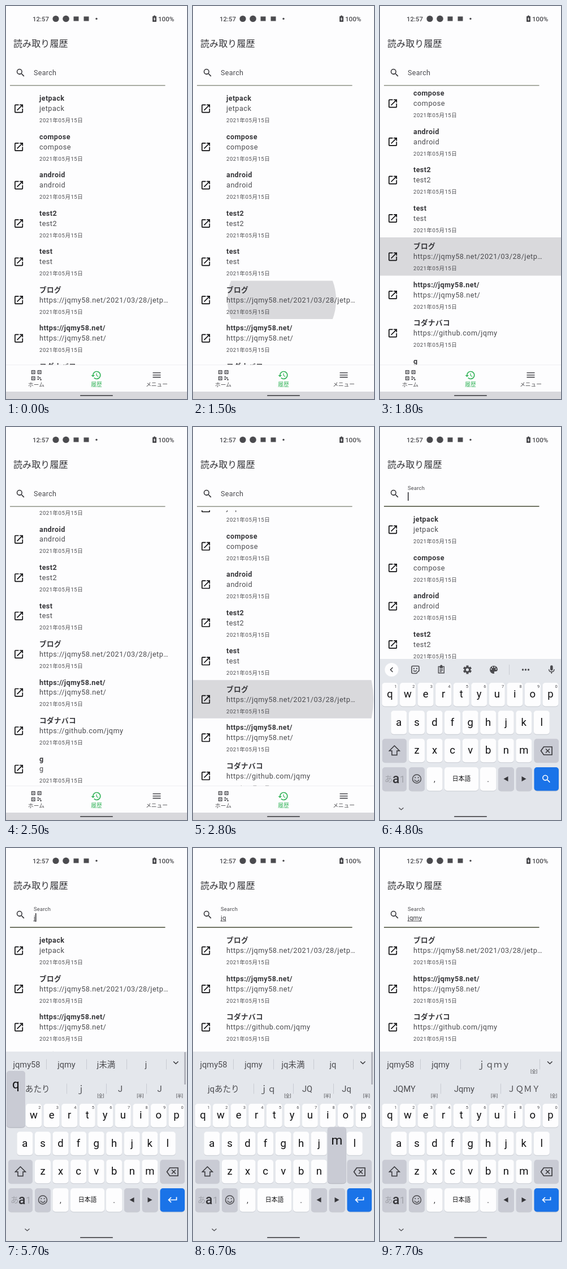
Write an HTML page with a canvas that moves like this. It is 320x693 px and loops after 8 s.

```html
<!DOCTYPE html>
<html lang="ja">
<head>
<meta charset="utf-8">
<title>読み取り履歴</title>
<style>
html, body { margin: 0; width: 100%; height: 100%; overflow: hidden; background: #fdfdfe; }
canvas { display: block; width: 320px; height: 693px; }
</style>
</head>
<body>
<canvas id="stage"></canvas>
<script>
const W = 320, H = 693, LOOP = 8000, STEP = 100;
const FONT = 'Roboto, "Noto Sans CJK JP", "Noto Sans CJK", sans-serif';
const C = {
  bg: '#fdfdfe', ink: '#36363a', soft: '#4b4b4f', black: '#101012', green: '#35b45a',
  board: '#e4e7ec', key: '#fdfdfe', mod: '#c9cbd4', down: '#b2b4bd', edge: '#c8cbd2',
  blue: '#1a73e8', faint: '#a0a2a9', ripple: '#d9d9dc', strip: '#d8d8dc', field: '#5a5f4c'
};
const canvas = document.getElementById('stage');
const ctx = canvas.getContext('2d');
const dpr = window.devicePixelRatio || 1;
canvas.width = W * dpr;
canvas.height = H * dpr;

const ICONS = {
  open: 'M19 19H5V5h7V3H5a2 2 0 0 0-2 2v14a2 2 0 0 0 2 2h14c1.1 0 2-.9 2-2v-7h-2zM14 3v2h3.59l-9.83 9.83 1.41 1.41L19 6.41V10h2V3z',
  search: 'M15.5 14h-.79l-.28-.27A6.47 6.47 0 0 0 16 9.5 6.5 6.5 0 1 0 9.5 16c1.61 0 3.09-.59 4.23-1.57l.27.28v.79l5 4.99L20.49 19zm-6 0a4.5 4.5 0 1 1 0-9 4.5 4.5 0 0 1 0 9z',
  history: 'M13 3a9 9 0 0 0-9 9H1l4 4 4-4H6a7 7 0 1 1 2.06 4.94l-1.42 1.42A9 9 0 1 0 13 3zm-1 5v5l4.28 2.54.72-1.21-3.5-2.08V8z',
  menu: 'M3 6h18v2H3zM3 11h18v2H3zM3 16h18v2H3z',
  mic: 'M12 14a3 3 0 0 0 3-3V5a3 3 0 0 0-6 0v6a3 3 0 0 0 3 3zm5-3a5 5 0 0 1-10 0H5a7 7 0 0 0 6 6.9V21h2v-3.1A7 7 0 0 0 19 11z',
  palette: 'M12 3a9 9 0 0 0 0 18c1.5 0 2-1.4 1.2-2.5-.8-1 0-2.5 1.3-2.5H16a5 5 0 0 0 5-5c0-4.4-4-8-9-8zM6.5 12a1.5 1.5 0 1 1 0-3 1.5 1.5 0 0 1 0 3zm3-4a1.5 1.5 0 1 1 0-3 1.5 1.5 0 0 1 0 3zm5 0a1.5 1.5 0 1 1 0-3 1.5 1.5 0 0 1 0 3zm3 4a1.5 1.5 0 1 1 0-3 1.5 1.5 0 0 1 0 3z',
  clip: 'M4 3h5a3 3 0 0 1 6 0h5v18H4zM6 5v14h12V5h-2v3H8V5zM8 10h8v1.7H8zM8 13h8v1.7H8zM8 16h5v1.7H8z'
};
for (const k in ICONS) ICONS[k] = new Path2D(ICONS[k]);

const ITEMS = [
  ['jetpack', 'jetpack'], ['compose', 'compose'], ['android', 'android'],
  ['test2', 'test2'], ['test', 'test'],
  ['ブログ', 'https://jqmy58.net/2021/03/28/jetp…'],
  ['https://jqmy58.net/', 'https://jqmy58.net/'],
  ['コダナバコ', 'https://github.com/jqmy'], ['g', 'g']
];
const ROW = 67.5, LIST_TOP = 147, SCROLL_MAX = 118;

const EDITS = [[3400, ''], [5400, 'j'], [5800, 'jq'], [6800, 'jqm'], [7200, 'jqmy']];
const PRESSES = [['j', 5200, 5400], ['q', 5600, 5800], ['m', 6700, 6800], ['y', 7100, 7200]];
const RIPPLES = [[1500, 1900], [2600, 2900]];

function ease(t, from, to) {
  const u = Math.min(1, Math.max(0, (t - from) / (to - from)));
  return u * u * (3 - 2 * u);
}
// swipe up to the end of the list, then back to its top
const scrollAt = t => SCROLL_MAX * (ease(t, 1500, 2000) - ease(t, 2490, 2990));
const lastEdit = t => EDITS.filter(e => e[0] <= t).pop() || [0, ''];

function text(s, x, y, size, { color = C.ink, weight = 400, gap = 0, align = 'left' } = {}) {
  ctx.font = `${weight} ${size}px ${FONT}`;
  ctx.letterSpacing = gap + 'px';
  ctx.textAlign = align;
  ctx.fillStyle = color;
  ctx.fillText(s, x, y + size * .35);
  return ctx.measureText(s).width;
}
const mid = (s, x, y, size, opt) => text(s, x, y, size, { align: 'center', ...opt });

function rect(x, y, w, h, color) {
  ctx.fillStyle = color;
  ctx.fillRect(x, y, w, h);
}
function round(x, y, w, h, r, color) {
  ctx.fillStyle = color;
  ctx.beginPath();
  ctx.roundRect(x, y, w, h, r);
  ctx.fill();
}
function dot(x, y, r, color) {
  ctx.fillStyle = color;
  ctx.beginPath();
  ctx.arc(x, y, r, 0, 7);
  ctx.fill();
}
function line(points, color = C.ink, width = 1.5) {
  ctx.strokeStyle = color;
  ctx.lineWidth = width;
  ctx.beginPath();
  points.forEach(([x, y]) => ctx.lineTo(x, y));
  ctx.stroke();
}
function poly(points, color) {
  ctx.fillStyle = color;
  ctx.beginPath();
  points.forEach(([x, y]) => ctx.lineTo(x, y));
  ctx.fill();
}
function at(x, y, s, draw) {
  ctx.save();
  ctx.translate(x, y);
  ctx.scale(s, s);
  draw();
  ctx.restore();
}
function icon(name, x, y, size, color) {
  at(x, y, size / 24, () => {
    ctx.translate(-12, -12);
    ctx.fillStyle = color;
    ctx.fill(ICONS[name]);
  });
}
function clipped(x, y, w, h, draw) {
  ctx.save();
  ctx.beginPath();
  ctx.rect(x, y, w, h);
  ctx.clip();
  draw();
  ctx.restore();
}

function statusBar() {
  text('12:57', 47, 23, 11.4, { weight: 500, color: C.soft });
  dot(88, 22.5, 5.6, C.soft);
  dot(106, 22.5, 5.8, C.soft);
  rect(119.5, 18.5, 9, 8, C.soft);
  rect(137.5, 18.5, 9, 8, C.soft);
  dot(160, 22.5, 1.7, C.soft);
  round(259, 18, 7, 10, 1, C.soft);
  rect(261, 16.8, 3, 2, C.soft);
  poly([[263, 19.5], [260.8, 23.5], [262.2, 23.5], [262, 26.5], [264.3, 22.4], [262.8, 22.4]], C.bg);
  text('100%', 269, 23, 11.6, { weight: 500, color: C.soft });
}

function header(t) {
  const focus = t >= 3400;
  const [since, query] = lastEdit(t);
  text('読み取り履歴', 13, 66.3, 16, { gap: .1 });
  icon('search', 25.8, 117.8, 18.7, C.ink);
  const k = ease(t, 3300, 3500);
  text('Search', 49, 117.5 - 9.5 * k, 12.5 - 3.1 * k, { gap: .3 - .1 * k, color: C.soft });
  rect(7, focus ? 139 : 139.6, 274.5, focus ? 1.7 : 1, C.field);
  if (!focus) return;
  let w = 0;
  if (query) {
    w = text(query, 49, 122.8, 11.4, { gap: .15 });
    rect(49, 128.4, w, 1, C.soft);
  }
  if (Math.floor((t - since) / 500) % 2 === 0) rect(49 + w, 115, 1.6, 15, C.ink);
}

function ripple(t, y) {
  for (const [start, end] of RIPPLES) {
    if (t < start || t >= end + 100) continue;
    ctx.globalAlpha = t >= end ? .5 : 1;
    clipped(0, y, W, ROW, () => dot(157, y + ROW / 2, Math.min(200, 96 + (t - start) * .33), C.ripple));
    ctx.globalAlpha = 1;
  }
}

function list(t, bottom) {
  const query = lastEdit(t - 100)[1];
  const shown = ITEMS.filter(item => item.join(' ').includes(query));
  const scroll = scrollAt(t);
  clipped(0, LIST_TOP, W, bottom - LIST_TOP, () => shown.forEach(([name, url], i) => {
    const y = 147 + i * ROW - scroll;
    if (name === 'ブログ') ripple(t, y);
    icon('open', 22.6, y + 34, 20, C.black);
    text(name, 59, y + 16, 12.6, { weight: 700, gap: .4 });
    text(url, 59, y + 33.8, 12.7, { gap: .48, color: C.soft });
    text('2021年05月15日', 59, y + 55, 9.5, { gap: .55, color: C.soft });
  }));
}

function codeIcon(x, y) {
  at(x, y, .78, () => {
    [[-11, -11], [3, -11], [-11, 3]].forEach(([a, b]) => {
      ctx.strokeStyle = C.soft;
      ctx.lineWidth = 1.8;
      ctx.strokeRect(a + 1, b + 1, 7, 7);
      rect(a + 3.3, b + 3.3, 2.4, 2.4, C.soft);
    });
    [[3, 3], [7, 5], [3, 8], [9, 9]].forEach(([a, b]) => rect(a, b, 3, 3, C.soft));
  });
}

function tabs() {
  rect(0, 633, W, 48, C.bg);
  rect(0, 632.5, W, .8, '#ececee');
  codeIcon(53.3, 650.7);
  icon('history', 159.5, 651, 19.5, C.green);
  icon('menu', 266.5, 650.7, 18.7, C.soft);
  mid('ホーム', 53.5, 668, 9.6, { color: C.soft });
  mid('履歴', 160, 668, 9.8, { color: C.green, weight: 500 });
  mid('メニュー', 266.5, 668, 9.7, { color: C.soft });
  rect(0, 680, W, 13, C.strip);
}

function gear(x, y) {
  for (let i = 0; i < 6; i++) {
    ctx.save();
    ctx.translate(x, y);
    ctx.rotate(i * Math.PI / 3);
    rect(-2, -7.5, 4, 4, C.soft);
    ctx.restore();
  }
  dot(x, y, 5.5, C.soft);
  dot(x, y, 2.6, C.board);
}

function face(x, y, r) {
  ctx.strokeStyle = C.soft;
  ctx.lineWidth = 1.5;
  ctx.beginPath();
  ctx.arc(x, y, r, 0, 7);
  ctx.stroke();
  ctx.beginPath();
  ctx.arc(x, y + .5, r * .52, .2, Math.PI - .2);
  ctx.stroke();
  dot(x - r * .36, y - r * .3, 1.1, C.soft);
  dot(x + r * .36, y - r * .3, 1.1, C.soft);
}

function toolbar(y) {
  dot(20.5, y, 12, C.key);
  line([[22.5, y - 4], [18.5, y], [22.5, y + 4]]);
  ctx.strokeStyle = C.soft;
  ctx.lineWidth = 1.6;
  ctx.beginPath();
  ctx.roundRect(56, y - 6.5, 13, 13, 2);
  ctx.stroke();
  poly([[70, y + 2], [70, y + 8], [64, y + 8]], C.board);
  line([[69, y + 1.5], [64, y + 6.5]], C.soft);
  dot(60, y - 2, 1.2, C.soft);
  dot(65, y - 2, 1.2, C.soft);
  line([[59, y + 1.5], [62, y + 3], [65, y + 1.5]], C.soft);
  icon('clip', 108.3, y, 17, C.soft);
  gear(154.5, y);
  icon('palette', 201, y, 18.5, C.soft);
  rect(228, y - 9, 1, 18, C.edge);
  [-5, 0, 5].forEach(d => dot(257.5 + d, y, 1.7, C.soft));
  icon('mic', 303.3, y, 18.5, C.soft);
}

function key(x, y, w, h, color = C.key) {
  round(x, y + 1, w, h, 5, C.edge);
  round(x, y, w, h, 5, color);
}
function eraser(x, y) {
  ctx.strokeStyle = C.ink;
  ctx.lineWidth = 1.6;
  ctx.beginPath();
  [[-10, 0], [-5, -7], [9.5, -7], [9.5, 7], [-5, 7]].forEach(([a, b]) => ctx.lineTo(x + a, y + b));
  ctx.closePath();
  ctx.stroke();
  line([[x - 1.5, y - 3.5], [x + 5.5, y + 3.5]]);
  line([[x + 5.5, y - 3.5], [x - 1.5, y + 3.5]]);
}
const arrow = (x, y, d) => poly([[x + 4 * d, y], [x - 4 * d, y - 4.5], [x - 4 * d, y + 4.5]], C.ink);

function boardFoot() {
  line([[33.5, 671.5], [37.5, 675], [41.5, 671.5]], C.soft, 1.3);
}

function kanaBoard(t) {
  const ys = [478, 527, 576, 624.5], xs = [4, 67, 130, 193.5, 257], w = 59.5, h = 42.5;
  rect(0, 435, W, 300, C.board);
  toolbar(454.5);
  ys.forEach((y, r) => xs.forEach((x, c) => {
    let color = c % 4 ? C.key : C.mod;
    if (r === 3 && c === 4) color = C.blue;
    if (r === 3 && c === 0 && t >= 4700) color = C.down;
    key(x, y, w, h, color);
  }));
  ['あかさ', 'たなは', 'まやら', ' わ '].forEach((s, r) =>
    [...s].forEach((ch, c) => mid(ch, xs[c + 1] + w / 2, ys[r] + 21, 18, { color: C.black })));
  line([[44, 502], [44, 498.5], [23, 498.5]]);
  line([[28, 494], [23, 498.5], [28, 503]]);
  arrow(33, 548, -1);
  face(25.5, 597, 7.8);
  text('記', 35.5, 597, 15);
  text('あ', 15, 646, 15.5, { weight: 700 });
  text('a1', 31, 646, 18, { color: C.faint });
  eraser(286.5, 499);
  arrow(286.5, 548, 1);
  line([[279, 596], [279, 599.5], [294.5, 599.5], [294.5, 596]]);
  icon('search', 286.5, 645.5, 19, '#fff');
  mid('゛゜', 99, 643, 17, { color: C.black });
  mid('大⇔小', 96.5, 653, 7.5);
  mid('?', 222.5, 634, 9);
  mid('、', 224, 643, 10);
  mid('!', 237, 645, 9);
  mid('。', 209, 643, 10);
  mid('…', 222.5, 656, 9);
  boardFoot();
}

const LETTERS = [['qwertyuiop', 17.5, 451], ['asdfghjkl', 33.4, 500.3], ['zxcvbnm', 65, 549.7]];
const PITCH = 31.55, KEY_W = 28, KEY_H = 41.5;

function alphaBoard(query, top) {
  rect(0, top, W, H - top, C.board);
  if (top > 400) toolbar(428);
  LETTERS.forEach(([row, x0, y], r) => [...row].forEach((ch, i) => {
    const x = x0 + i * PITCH;
    key(x - KEY_W / 2, y, KEY_W, KEY_H);
    mid(ch, x, y + 20, 18.5, { color: C.black });
    if (!r) mid((i + 1) % 10, x + 10.2, y + 6, 7.5, { color: C.soft });
  }));
  key(4, 549.7, 43, KEY_H, C.mod);
  ctx.strokeStyle = C.ink;
  ctx.lineWidth = 1.5;
  ctx.beginPath();
  [[0, -9], [9, 0], [4.5, 0], [4.5, 7.5], [-4.5, 7.5], [-4.5, 0], [-9, 0]].forEach(([a, b]) => ctx.lineTo(25.5 + a, 571 + b));
  ctx.closePath();
  ctx.stroke();
  key(272.5, 549.7, 43.5, KEY_H, C.mod);
  eraser(294.5, 571);
  [[4, 43, C.mod], [51, 28, C.mod], [82.5, 28, C.key], [114, 60, C.key], [177, 28.5, C.key],
    [209, 28, C.mod], [240.7, 28, C.mod], [272.5, 43.5, C.blue]].forEach(([x, w, c]) => key(x, 600, w, KEY_H, c));
  text('あ', 8, 621, 14.5, { color: C.faint });
  text('a', 22, 619.5, 23, { weight: 500 });
  text('1', 35, 621, 17, { color: C.faint });
  face(65, 620.5, 7.5);
  mid(',', 96.5, 621, 14);
  mid('日本語', 144, 620.5, 10.8, { color: C.black });
  mid('.', 191.2, 621, 14);
  arrow(222.5, 620.5, -1);
  arrow(254.5, 620.5, 1);
  if (query) {
    line([[301.5, 615.5], [301.5, 620.5], [287.5, 620.5]], '#fff', 1.7);
    line([[292, 616], [287.5, 620.5], [292, 625]], '#fff', 1.7);
  } else icon('search', 294.2, 620.5, 19, '#fff');
  boardFoot();
}

function candidates(q) {
  const wide = [...q].map(c => String.fromCharCode(c.charCodeAt(0) + 0xfee0)).join('');
  const cap = q[0].toUpperCase() + q.slice(1);
  const done = q.length === 4;
  const word = (s, x, y) => mid(s, x, y, 14.6, { color: C.soft });
  const tag = (s, x, y) => mid(`[${s}]`, x, y, 8, { color: C.soft });
  const bars = (xs, y) => xs.forEach(x => rect(x, y - 9, 1, 18, C.edge));
  word('jqmy58', 36.5, 381.5);
  word('jqmy', 107, 381.5);
  if (done) {
    word(wide, 201, 381.5);
    tag('全', 272, 394);
    [[q.toUpperCase(), 43, '半'], [cap, 149, '半'], [wide.toUpperCase(), 254, '全']].forEach(([s, x, k]) => {
      word(s, x, 424.5);
      tag(k, x + 53, 437);
    });
    bars([71, 142, 282], 381.5);
    bars([107, 213], 424.5);
  } else {
    word(q + '未満', 177, 381.5);
    word(q, 247.5, 381.5);
    word(q + 'あたり', 54, 424.5);
    [[wide, 132, '全'], [q.toUpperCase(), 202, '半'], [cap, 271.5, '半']].forEach(([s, x, k]) => {
      word(s, x, 424.5);
      tag(k, x + 35.3, 437);
    });
    bars([71, 142, 213, 283], 381.5);
    bars([107, 177, 248], 424.5);
    rect(315, 360, 3, 57, C.down);
  }
  line([[296, 376.5], [300.3, 380.5], [304.5, 376.5]]);
}

function popup(ch) {
  const [row, x0, y] = LETTERS.find(r => r[0].includes(ch));
  const x = x0 + row.indexOf(ch) * PITCH;
  round(x - 16.5, y - 57, 33, 58 + KEY_H, 5, C.down);
  round(x - 16.5, y - 58, 33, 58 + KEY_H, 5, C.mod);
  mid(ch, x, y - 34.5, 22.5, { color: C.black });
}

function draw(t) {
  ctx.setTransform(dpr, 0, 0, dpr, 0, 0);
  rect(0, 0, W, H, C.bg);
  const query = lastEdit(t)[1];
  const hint = lastEdit(t - 100)[1];
  const alpha = t >= 4800;
  const rise = ease(t, 3400, 3700);
  const drop = (1 - rise) * 258;
  const top = alpha ? (hint ? 359 : 409) : 435 + drop;
  statusBar();
  list(t, Math.min(633, top));
  header(t);
  tabs();
  if (alpha) {
    alphaBoard(query, top);
    if (hint) candidates(hint);
    PRESSES.forEach(([ch, from, to]) => { if (t >= from && t < to) popup(ch); });
  } else if (rise > 0) {
    at(0, drop, 1, () => kanaBoard(t));
  }
  round(131, 686, 58, 1.8, 1, C.soft);
}

function frame() {
  const t = performance.now() % LOOP;
  draw(Math.floor(t / STEP) * STEP);
  requestAnimationFrame(frame);
}
frame();
</script>
</body>
</html>
```
